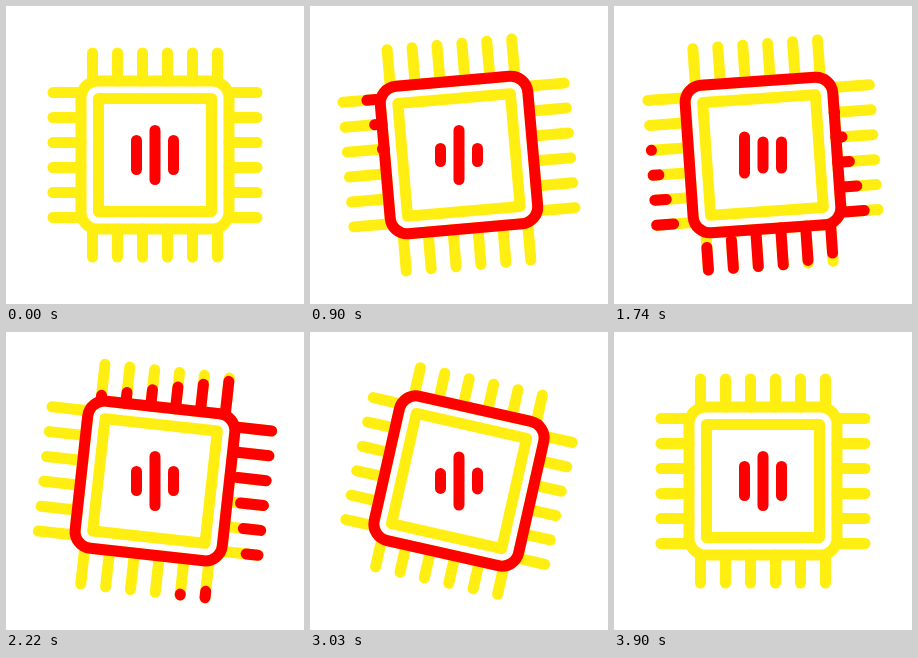
An HTML page with a canvas that plays this animation: 298x298 px, repeating every 4.5 s.

```html
<!DOCTYPE html>
<html>
<head>
<meta charset="utf-8">
<style>
  html, body { margin: 0; height: 100%; overflow: hidden; background: #fff; }
  canvas { display: block; }
</style>
</head>
<body>
<canvas id="stage" width="298" height="298"></canvas>
<script>
const ctx = document.getElementById('stage').getContext('2d');
const LOOP = 4500, START = 330, END = 3900;
const YELLOW = '#ffee11', RED = '#ff0000';
const HALF = 74, RADIUS = 17, RING_START = -45;
const RING_LENGTH = 8 * (HALF - RADIUS) + 2 * Math.PI * RADIUS;

// Keyframes: [time, value]
const angleKeys = [[330, 0], [1320, -8], [2820, 13.8], [3970, 0]];
const reachKeys = [[330, 102], [820, 111], [2160, 111], [2640, 98], [3000, 102]];
const barTimes = [330, 615, 900, 1180, 1460, 1740, 2220, 2640, 2970, 3300, 3900];
const bars = [
  [20, 23, 12, 23, 12, 23.5, 15, 19, 13, 12, 20],
  [30, 19, 30, 19, 30, 18.5, 30, 18.5, 30, 24, 30],
  [20, 19, 12, 19, 12, 18.5, 15, 19, 13, 18.5, 20]
].map(values => values.map((v, i) => [barTimes[i], v]));

const progress = (t, start, duration) => Math.min(1, Math.max(0, (t - start) / duration));
const ease = p => (1 - Math.cos(Math.PI * p)) / 2;

function valueAt(keys, t) {
  if (t <= keys[0][0]) return keys[0][1];
  for (let i = 1; i < keys.length; i++) {
    const [t0, v0] = keys[i - 1], [t1, v1] = keys[i];
    if (t < t1) return v0 + (v1 - v0) * ease((t - t0) / (t1 - t0));
  }
  return keys[keys.length - 1][1];
}

function line(color, x0, y0, x1, y1) {
  ctx.strokeStyle = color;
  ctx.beginPath();
  ctx.moveTo(x0, y0);
  ctx.lineTo(x1, y1);
  ctx.stroke();
}

// Rounded square, traced counter-clockwise from the upper left side
function ring(color, from, to) {
  if (to <= from) return;
  const h = HALF;
  ctx.strokeStyle = color;
  ctx.beginPath();
  ctx.moveTo(-h, RING_START);
  ctx.arcTo(-h, h, h, h, RADIUS);
  ctx.arcTo(h, h, h, -h, RADIUS);
  ctx.arcTo(h, -h, -h, -h, RADIUS);
  ctx.arcTo(-h, -h, -h, h, RADIUS);
  ctx.lineTo(-h, RING_START);
  ctx.setLineDash([(to - from) * RING_LENGTH, RING_LENGTH * 2]);
  ctx.lineDashOffset = -from * RING_LENGTH;
  ctx.stroke();
  ctx.setLineDash([]);
}

function eachPin(draw) {
  for (let i = 0; i < 24; i++) {
    ctx.save();
    ctx.rotate(-Math.floor(i / 6) * Math.PI / 2);
    draw(i, -62.5 + 25 * (i % 6));
    ctx.restore();
  }
}

function draw(t) {
  if (t >= END) t = 0;
  const reach = valueAt(reachKeys, t);
  const along = p => -(HALF + (reach - HALF) * p);

  ctx.fillStyle = '#fff';
  ctx.fillRect(0, 0, 298, 298);
  ctx.lineWidth = 11;
  ctx.lineCap = ctx.lineJoin = 'round';
  ctx.save();
  ctx.translate(149, 149);

  ctx.save();
  ctx.rotate(valueAt(angleKeys, t) * Math.PI / 180);
  eachPin((i, y) => line(YELLOW, along(0), y, along(1), y));
  ring(YELLOW, 0, 1);
  ctx.strokeRect(-56.5, -56.5, 113, 113);

  // Red pulses run outwards along the pins, one after another
  eachPin((i, y) => {
    const head = progress(t, 760 + 61 * i, 400);
    const tail = progress(t, 1220 + 61 * i, 400);
    if (head > tail) line(RED, along(tail), y, along(head), y);
  });
  ring(RED, ease(progress(t, 3030, 600)), ease(progress(t, START, 550)));
  ctx.restore();

  bars.forEach((keys, i) => {
    const x = (i - 1) * 18.5, h = valueAt(keys, t) - 5.5;
    line(RED, x, -h, x, h);
  });
  ctx.restore();
}

function tick() {
  draw(performance.now() % LOOP);
  requestAnimationFrame(tick);
}
tick();
</script>
</body>
</html>
```
